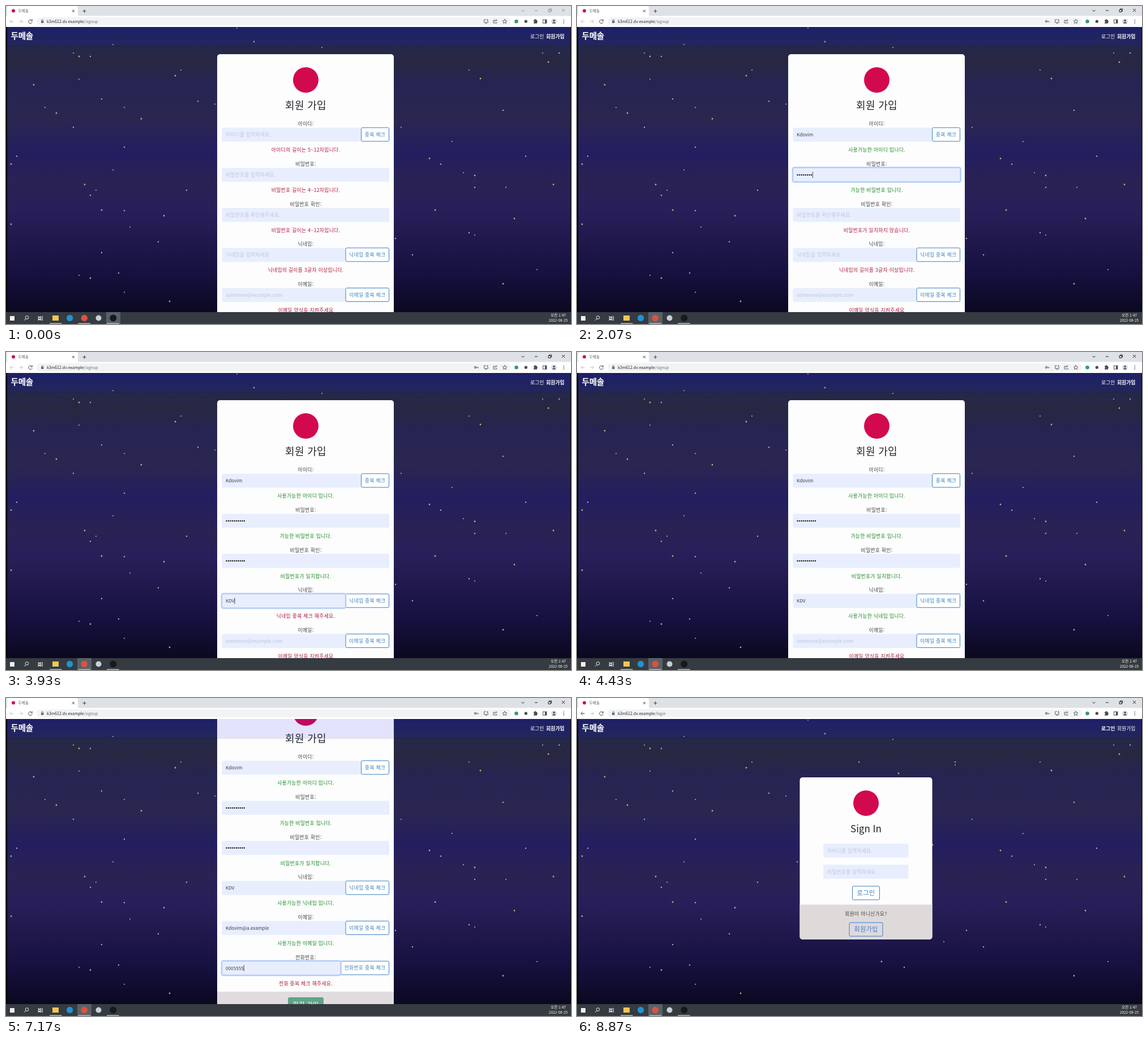
An HTML page that plays this animation: 998x561 px, repeating every 8910 ms.

```html
<!DOCTYPE html>
<html lang="ko">
<head>
<meta charset="utf-8">
<style>
html, body { margin: 0; width: 100%; height: 100%; overflow: hidden; background: #000; }
svg { display: block; width: 100vw; height: 100vh; }
text { font-family: "Noto Sans CJK KR", "Noto Sans CJK JP", "Noto Sans", sans-serif; white-space: pre; }
.mid { text-anchor: middle; }
.ko { letter-spacing: .3px; }
.line { fill: none; stroke-width: 1; }
</style>
</head>
<body>
<svg id="stage" viewBox="0 0 998 561" preserveAspectRatio="none"></svg>
<script>
const LOOP = 8910, LOGIN_AT = 8360, ACTIVE_AT = 260;
const RED = '#b01a3c', GREEN = '#1b8a22', BLUE = '#3d80bd', BRAND = '#d3094f', FIELD = '#e8eefe';
const SITE = '두메솔', HOST = 'k3m612.dv.example';
const $ = id => document.getElementById(id);

const rect = (x, y, w, h, fill, extra = '') =>
  `<rect x="${x}" y="${y}" width="${w}" height="${h}" fill="${fill}" ${extra}/>`;
const disc = (x, y, r, fill, extra = '') => `<circle cx="${x}" cy="${y}" r="${r}" fill="${fill}" ${extra}/>`;
const path = (d, stroke, extra = '') => `<path class="line" d="${d}" stroke="${stroke}" ${extra}/>`;
// y is the vertical centre of the text
const text = (x, y, s, size, fill, extra = '') =>
  `<text x="${x}" y="${y + size * .37}" font-size="${size}" fill="${fill}" ${extra}>${s}</text>`;
const centered = (x, y, s, size, fill, extra = '') => text(x, y, s, size, fill, `class="mid ko" ${extra}`);
const button = (x, y, w, s, size, fill = '#fff', color = BLUE) =>
  rect(x + .5, y + .5, w - 1, 24, fill, `rx="2" stroke="${color}"`) + centered(x + w / 2, y + 12.5, s, size, color);

// value typed from `start`, one character every `step` ms
const fields = [
  { label: '아이디:', hint: '아이디를 입력하세요.', value: 'Kdovim', focus: 380, start: 500, step: 85, check: 1250, end: 1250, btn: '중복 체크', btnW: 50 },
  { label: '비밀번호:', hint: '비밀번호를 입력하세요.', value: '**********', focus: 1450, start: 1600, step: 57, end: 2420, secret: true },
  { label: '비밀번호 확인:', hint: '비밀번호를 확인해주세요.', value: '**********', focus: 2420, start: 2550, step: 60, end: 3360, secret: true },
  { label: '닉네임:', hint: '닉네임을 입력하세요', value: 'KDV', focus: 3360, start: 3500, step: 120, check: 4300, end: 4300, btn: '닉네임 중복 체크', btnW: 77.5 },
  { label: '이메일:', hint: 'someone@example.com', value: 'Kdovim@a.example', focus: 4960, start: 5090, step: 58, check: 6300, end: 6300, btn: '이메일 중복 체크', btnW: 77.5 },
  { label: '전화번호:', hint: '전화번호를 입력해주세요', value: '00055550000', focus: 6560, start: 6720, step: 60, check: 7680, end: 7680, btn: '전화번호 중복 체크', btnW: 86 }
];
const ROW = 70.7, SUBMIT_AT = 8000;

function messages(n, t) {
  const ok = i => t >= fields[i].check;
  const short = '비밀번호 길이는 4~12자입니다.';
  const ask = s => [s + ' 중복 체크 해주세요.', RED];
  const free = s => [`사용가능한 ${s} 입니다.`, GREEN];
  return [
    ok(0) ? free('아이디') : n[0] < 5 ? ['아이디의 길이는 5~12자입니다.', RED] : ask('아이디'),
    n[1] < 4 ? [short, RED] : ['가능한 비밀번호 입니다.', GREEN],
    n[1] < 4 ? [short, RED] : n[1] === n[2] ? ['비밀번호가 일치합니다.', GREEN] : ['비밀번호가 일치하지 않습니다.', RED],
    ok(3) ? free('닉네임') : n[3] < 3 ? ['닉네임의 길이를 3글자 이상입니다.', RED] : ask('닉네임'),
    ok(4) ? free('이메일') : n[4] < 16 ? ['이메일 양식을 지켜주세요', RED] : ask('이메일'),
    ok(5) ? free('전화번호') : n[5] < 1 ? ['숫자만 입력해주세요', RED] : ask('전화')
  ];
}

function fieldRow(f, i) {
  const y = 208 + ROW * i, w = 295.5 - (f.btn ? f.btnW : 0);
  return centered(529.5, y, f.label, 8.8, '#444')
    + rect(381.5, y + 6.7, w, 24.6, FIELD, 'rx="2.5"')
    + (f.btn ? button(677 - f.btnW, y + 6.2, f.btnW, f.btn, 8.8) : '')
    + `<g id="focus${i}">${rect(381, y + 6.2, w + 1, 25.6, FIELD, 'rx="3" stroke="#c3d8fb" stroke-width="3"')}`
    + rect(381.5, y + 6.7, w, 24.6, FIELD, 'rx="2.5" stroke="#93b7ee" stroke-width=".8"') + '</g>'
    + text(388, y + 19, f.hint, 8.7, '#bcc5d8', `id="hint${i}" ${i === 4 ? '' : 'class="ko"'}`)
    + (f.secret
      ? `<g id="value${i}">${[...f.value].map((_, k) => disc(389.6 + k * 3.48, y + 19.2, 1.25, '#222')).join('')}</g>`
      : text(388, y + 19, '', 8.2, '#3c4048', `id="value${i}"`))
    + rect(0, y + 13.5, .8, 11, '#222', `id="caret${i}"`)
    + centered(529.5, y + 46, '', 8.8, RED, `id="msg${i}"`);
}

const signup = () => `<g id="signup">
  ${rect(373, 85, 312, 585, '#fdfdfe', 'rx="5"')}
  <path d="M373 622H685V665a5 5 0 0 1-5 5H378a5 5 0 0 1-5-5Z" fill="#e1dce0"/>
  ${disc(529.5, 130.5, 22.5, BRAND)}
  ${centered(529.5, 175, '회원 가입', 18, '#212529', 'font-weight="500"')}
  ${fields.map(fieldRow).join('')}
  ${rect(497, 631, 65, 27.5, '#157347', 'id="ring" rx="4" stroke="#8fb9a5" stroke-width="2"')}
  ${rect(498, 632, 63, 25.5, '#5fa487', 'id="submit" rx="3"')}
  ${centered(529.5, 644.7, '회원 가입', 11.2, '#fff')}
</g>`;

const login = () => `<g id="login">
  ${rect(393.5, 140, 234, 286, '#fdfdfe', 'rx="5"')}
  <path d="M393.5 364.5H627.5V421a5 5 0 0 1-5 5H398.5a5 5 0 0 1-5-5Z" fill="#dfdada"/>
  ${disc(510.5, 185.5, 22.5, BRAND)}
  ${text(510.5, 231, 'Sign In', 17, '#212529', 'class="mid" font-weight="500"')}
  ${['아이디를', '비밀번호를'].map((s, i) => rect(435, 257 + i * 37.2, 150.5, 24.6, FIELD, 'rx="2.5"')
    + text(442, 269.3 + i * 37.2, s + ' 입력하세요.', 8.7, '#bcc5d8', 'class="ko"')).join('')}
  ${button(486, 331.5, 49, '로그인', 11.2)}
  ${centered(510.5, 381, '회원이 아니신가요?', 8.8, '#444')}
  ${button(480.5, 395.7, 60, '회원가입', 11.2, 'none', '#3b7bd6')}
</g>`;

const STARS = [
  119,83, 129,89, 149,89, 129,129, 49,139, 169,164, 69,179, 89,189, 119,214, 209,179, 239,199, 209,249,
  189,68, 9,279, 19,265, 189,289, 139,315, 149,334, 159,325, 169,360, 209,361, 219,390, 9,385, 169,435,
  129,475, 149,480, 199,471, 209,505, 289,521, 319,325, 309,113, 299,123, 339,168, 369,173, 279,370, 269,416,
  818,113, 838,128, 878,184, 788,239, 748,269, 768,279, 808,294, 828,299, 828,320, 883,320, 967,315, 918,265,
  948,83, 958,99, 977,83, 698,214, 758,360, 818,400, 828,404, 898,375, 718,439, 938,465, 878,490, 688,410,
  408,39, 438,63, 498,113, 558,73, 568,133, 668,113, 668,118, 628,259, 389,289, 648,430, 538,465, 578,475
];
function sky() {
  const stops = [[37, '#1f2258'], [70, '#25284a'], [100, '#282742'], [140, '#262453'], [200, '#2a2650'], [260, '#231e60'],
    [310, '#2a2253'], [360, '#281f5a'], [410, '#21194d'], [470, '#161140'], [540, '#0b0820']];
  let out = `<linearGradient id="night" x2="0" y2="1">${stops.map(([y, c]) =>
    `<stop offset="${(y - 37) / 503}" stop-color="${c}"/>`).join('')}</linearGradient>` + rect(2, 37, 995, 503, 'url(#night)');
  for (let i = 0; i < STARS.length; i += 2)
    out += disc(STARS[i], STARS[i + 1], 1 + i % 3 * .2, ['#d9d2b0', '#c5c3cf', '#d8c57c'][i % 3], 'opacity=".85"');
  return out;
}

const header = () => rect(2, 70, 995, 2.5, '#000', 'opacity=".07"')
  + rect(2, 37, 995, 33.5, '#1414e6', 'opacity=".11"')
  + text(8.5, 53, SITE, 14.6, '#fff', 'font-weight="900" letter-spacing="-.3"')
  + text(926, 53.3, '로그인', 8.8, '#fff', 'id="navLogin"')
  + text(954, 53.3, '회원가입', 8.8, '#fff', 'id="navJoin"');

function browser() {
  const ink = '#5f6368';
  return rect(0, 0, 998, 18, '#dee1e6')
    + '<path d="M2 18V3q0-3 3-3H124q3 0 3 3V15q0 3 3 3Z" fill="#fff"/>'
    + rect(0, 17.5, 998, 19.5, '#fff')
    + disc(13, 8.5, 3, BRAND) + text(21.5, 8.5, SITE, 6.6, ink)
    + path('M116.8 6.8l4 4m0-4l-4 4M135.5 9h6m-3-3v6', '#3c4043')
    + `<g id="controls">${path('M910.5 7l2.5 2.5 2.5-2.5M934 8h5M958 6.5h4v4h-4zM959.5 6.5v-1.5h4v4h-1.5M982 5l5 5m0-5l-5 5', 'currentColor', 'stroke-width=".8"')}</g>`
    + path('M13.5 27.3h-6.5m3-3l-3 3 3 3', 'currentColor', 'id="back"')
    + path('M23 27.3h6.5m-3-3l3 3-3 3', '#bfc1c4')
    + path('M45.6 25.3a3.3 3.3 0 1 0 .7 3M46.3 23.6v2.6h-2.6', '#444')
    + rect(54, 20, 838, 14, '#f1f3f4', 'rx="7"')
    + rect(62, 26.3, 4.4, 3.6, ink) + path('M62.9 26.5v-1.2a1.3 1.3 0 0 1 2.6 0v1.2', ink, 'stroke-width=".8"')
    + text(72, 27.2, `${HOST}<tspan id="route" fill="#6b7074"></tspan>`, 7, '#202124')
    + `<g id="key">${disc(829, 27.2, 1.5, 'none', `stroke="${ink}" stroke-width="1.2"`)}${path('M830.6 27.2h4m-1 0v1.6', ink, 'stroke-width="1.3"')}</g>`
    + path('M848 24h-3.5v5h7v-2M846.5 30.5h3M850.5 23v3m-1.3-1.2l1.3 1.3 1.3-1.3', ink)
    + path('M863.5 25h-2.5v5h6v-1.8M863 28q0-3 4-3m-1.5-1.7l1.7 1.7-1.7 1.7', ink, 'stroke-width=".9"')
    + path('M881 23.3l1.1 2.5 2.7.3-2 1.8.6 2.7-2.4-1.4-2.4 1.4.6-2.7-2-1.8 2.7-.3z', ink, 'stroke-width=".9"')
    + disc(901.5, 27.2, 3.3, '#35987a') + disc(918.3, 27.2, 2.6, '#4a4d50')
    + '<path d="M932 24.5h2v-1.2h2v1.2h2v2h1v2h-1v2.2h-6v-2h1v-2h-1Z" fill="#4a4d50"/>'
    + rect(948.5, 24.2, 6.4, 6, 'none', 'stroke="#4a4d50"') + rect(952, 24.2, 3, 6, '#4a4d50')
    + disc(968, 27.2, 5, '#d3dbe8') + disc(968, 25.6, 1.7, '#3d4757') + '<path d="M964.8 30.6q3.2-5 6.4 0Z" fill="#3d4757"/>'
    + [24.5, 27.2, 29.9].map(y => disc(985.3, y, .8, '#444')).join('');
}

function taskbar() {
  const W = '#f0f0f0';
  return rect(0, 540, 998, 21, '#353b40') + rect(126, 540, 25, 21, '#596167', 'id="active"')
    + rect(7, 547, 8, 8, W)
    + disc(37, 549.5, 2.8, 'none', `stroke="${W}"`) + path('M35 551.7l-3 3', W)
    + path('M57 547v1.5h5V547M57 555v-1.5h5V555M57 550h5v2.3h-5zM64.3 547v8', W, 'stroke-width=".8"')
    + rect(82, 546, 11, 9, '#f2c655') + disc(112.6, 550.5, 5.7, '#2391cf')
    + disc(138.3, 550.5, 5.7, '#dc5142') + disc(163.5, 550.5, 5, '#c5d0da') + disc(189.3, 550.5, 6, '#17191b')
    + [77, 127.5, 178].map(x => rect(x, 559.3, 21.5, 1.7, '#76b9ed')).join('')
    + text(975.5, 545.8, '오전 1:47', 6.7, '#fff', 'class="mid"')
    + text(975.5, 555, '2022-08-25', 6.5, '#fff', 'class="mid"');
}

$('stage').innerHTML = sky() + signup() + login() + header() + browser() + taskbar()
  + rect(0, 37, 1.5, 503, '#000') + rect(997, 37, 1, 503, '#000');

const show = (id, on) => $(id).setAttribute('visibility', on ? 'visible' : 'hidden');
const ease = (t, from, ms) => { const p = Math.min(1, Math.max(0, (t - from) / ms)); return p * p * (3 - 2 * p); };

function draw(t) {
  const onLogin = t >= LOGIN_AT, awake = t >= ACTIVE_AT;
  $('signup').style.display = onLogin ? 'none' : '';
  $('login').style.display = onLogin ? '' : 'none';
  $('route').textContent = onLogin ? '/login' : '/signup';
  $('navLogin').setAttribute('font-weight', onLogin ? 900 : 400);
  $('navJoin').setAttribute('font-weight', onLogin ? 400 : 900);
  $('back').setAttribute('color', onLogin ? '#444' : '#bfc1c4');
  $('controls').setAttribute('color', awake ? '#222' : '#92969b');
  $('active').setAttribute('x', awake ? 126 : 177);
  show('key', t >= fields[1].start + fields[1].step);
  if (onLogin) return;

  const scroll = 104 * ease(t, 4560, 260) + 101 * ease(t, 7740, 220);
  $('signup').setAttribute('transform', `translate(0 ${-scroll})`);
  const typed = fields.map(f => Math.max(0, Math.min(f.value.length, Math.floor((t - f.start) / f.step))));
  const notes = messages(typed, t);
  fields.forEach((f, i) => {
    const n = typed[i], value = $('value' + i), focused = t >= f.focus && t < f.end;
    let width = n * 3.48;
    if (f.secret) [...value.children].forEach((dot, k) => dot.setAttribute('opacity', k < n ? 1 : 0));
    else {
      value.textContent = f.value.slice(0, n);
      width = n ? value.getComputedTextLength() : 0;
    }
    $('caret' + i).setAttribute('x', 388 + width);
    show('caret' + i, focused);
    show('focus' + i, focused);
    show('hint' + i, !n);
    $('msg' + i).textContent = notes[i][0];
    $('msg' + i).setAttribute('fill', notes[i][1]);
  });
  $('submit').setAttribute('fill', t >= SUBMIT_AT ? '#157347' : t >= fields[5].check ? '#198754' : '#5fa487');
  show('ring', t >= SUBMIT_AT);
}

const began = performance.now();
function tick() {
  draw((performance.now() - began) % LOOP);
  requestAnimationFrame(tick);
}
tick();
</script>
</body>
</html>
```
